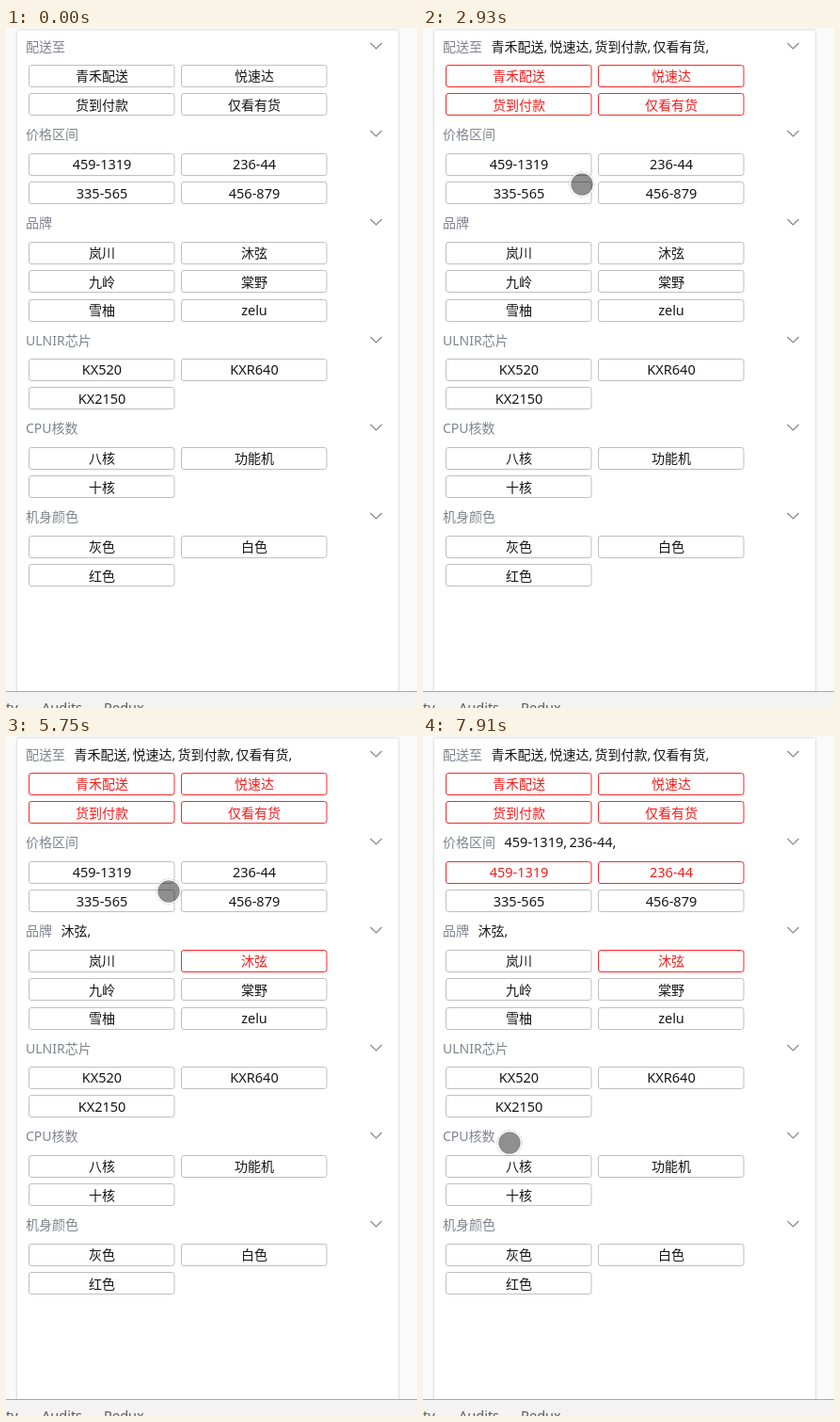
Animation, 437 px wide and 722 px high, one loop 7990 ms. Source, as an HTML page:

```html
<!DOCTYPE html>
<html lang="zh">
<head>
<meta charset="utf-8">
<title>筛选面板</title>
<style>
html, body { margin: 0; width: 100%; height: 100%; overflow: hidden; background: #fafafa; }
svg { display: block; width: 437px; height: 722px; }
text { font: 14px "Noto Sans", "Noto Sans CJK SC", "Noto Sans CJK JP", "Noto Sans CJK", sans-serif; fill: #161616; }
.latin { font-size: 14.5px; }
.head { fill: #80848c; }
.picked { word-spacing: -1.4px; }
.btn rect { fill: #fff; stroke: #bfbfbf; }
.btn text { text-anchor: middle; }
.btn.on rect { stroke: #f52a2a; }
.btn.on text { fill: #f51c1c; }
.chevron { fill: none; stroke: #85888e; stroke-width: 1.2; }
.tab { font-size: 14.5px; fill: #5c5c5c; }
</style>
</head>
<body>
<svg id="stage" viewBox="0 0 437 722">
  <defs>
    <filter id="soft" x="-5%" y="-5%" width="110%" height="110%"><feGaussianBlur stdDeviation="1.6"/></filter>
  </defs>
  <rect width="437" height="722" fill="#fafafa"/>
  <rect x="12" y="2.5" width="405" height="740" fill="#000" opacity=".22" filter="url(#soft)"/>
  <rect x="12" y="2.5" width="405" height="740" fill="#fff"/>
  <g id="panel"></g>
  <rect y="704" width="437" height="18" fill="#f3f3f3"/>
  <rect y="704" width="437" height="1" fill="#a8a8a8"/>
  <text class="tab" x="0" y="727">ty</text>
  <text class="tab" x="38" y="727">Audits</text>
  <text class="tab" x="104" y="727">Redux</text>
  <g id="cursor">
    <circle id="halo" fill="none" stroke="#000" stroke-opacity=".2"/>
    <circle r="12.4" fill="none" stroke="#fff" stroke-width="1.4"/>
    <circle id="dot" r="11.5" stroke="#000" stroke-opacity=".14"/>
  </g>
</svg>
<script>
const LOOP = 7990, STEP = 80;

// title, title centre y, title width, top of first button row, labels
const sections = [
  ['配送至', 20, 42, 39, ['青禾配送', '悦速达', '货到付款', '仅看有货']],
  ['价格区间', 113, 56, 133, ['459-1319', '236-44', '335-565', '456-879']],
  ['品牌', 207, 28, 227, ['岚川', '沐弦', '九岭', '棠野', '雪柚', 'zelu']],
  ['ULNIR芯片', 332, 72, 351, ['KX520', 'KXR640', 'KX2150']],
  ['CPU核数', 425, 56, 445, ['八核', '功能机', '十核']],
  ['机身颜色', 519, 56, 539, ['灰色', '白色', '红色']]
];

// time, section, option
const picks = [
  [1060, 0, 0], [1620, 0, 1], [2140, 0, 3], [2780, 0, 2],
  [5040, 2, 1], [6050, 1, 0], [7130, 1, 1]
];

// start, end, then [step, x, y]; a move begins where the last one ended
const moves = [
  [70, 820, [0, 313, 685], [1, 259, 512], [2, 217, 290], [4, 155, 130], [9, 94, 51]],
  [1060, 1450, [5, 229, 62]],
  [1620, 1910, [4, 233, 88]],
  [2140, 2550, [2, 205, 106], [5, 150, 88]],
  [2780, 3190, [2, 169, 166], [5, 171, 242]],
  [3720, 4500, [5, 318, 84], [7, 349, 108], [9, 308, 173], [10, 287, 227]],
  [4580, 4580, [0, 274, 247]],
  [4750, 4810, [0, 275, 238], [1, 275, 230]],
  [5040, 5810, [4, 240, 286], [7, 216, 215], [9, 173, 165], [10, 165, 164]],
  [5900, 5900, [0, 156, 163]],
  [6050, 6820, [3, 193, 238], [7, 168, 363], [10, 271, 211]],
  [6900, 6980, [0, 274, 185], [1, 275, 164]],
  [7130, 7910, [5, 190, 330], [10, 92, 432]]
];

const presses = [[890, 1060], [4750, 5040], [5900, 6050], [6980, 7130]];

const $ = id => document.getElementById(id);

function add(parent, tag, attrs, text) {
  const el = document.createElementNS('http://www.w3.org/2000/svg', tag);
  for (const key in attrs) el.setAttribute(key, attrs[key]);
  if (text) el.textContent = text;
  parent.appendChild(el);
  return el;
}

const latin = s => /^[\x20-\x7e]+$/.test(s) ? 'latin' : '';

const views = sections.map(([title, y, width, firstTop, labels]) => {
  const panel = $('panel');
  add(panel, 'text', { class: 'head', x: 21, y: y + 5 }, title);
  add(panel, 'path', { class: 'chevron', d: `M387.5 ${y - 4}l6 6l6 -6` });
  const picked = add(panel, 'text', { class: 'picked ' + latin(labels[0]), x: 30.5 + width, y: y + 5 });
  const buttons = labels.map((label, i) => {
    const x = 24.5 + (i % 2) * 162, top = firstTop + (i >> 1) * 30.5;
    const g = add(panel, 'g', { class: 'btn' });
    add(g, 'rect', { x, y: Math.floor(top) + .5, width: 154.5, height: 23, rx: 2.5 });
    add(g, 'text', { class: latin(label), x: x + 77.5, y: top + 17.2 }, label);
    return g;
  });
  return { picked, buttons, labels };
});

function cursorAt(t) {
  const index = moves.findLastIndex(m => m[0] <= t);
  if (index < 0) return null;
  const [start, end, ...path] = moves[index];
  if (path[0][0] > 0) path.unshift([0, ...moves[index - 1].at(-1).slice(1)]);
  const last = Math.round((end - start) / STEP);
  const step = last ? Math.min(last, Math.floor((t - start) / (end - start) * last + .25)) : 0;
  const next = path.findIndex(p => p[0] >= step);
  const b = path[next], a = path[Math.max(0, next - 1)];
  const f = b[0] > a[0] ? (step - a[0]) / (b[0] - a[0]) : 0;
  return [a[1] + (b[1] - a[1]) * f, a[2] + (b[2] - a[2]) * f];
}

function draw(t) {
  views.forEach(({ picked, buttons, labels }, s) => {
    const on = labels.map((_, i) => picks.some(p => p[0] <= t && p[1] === s && p[2] === i));
    buttons.forEach((b, i) => b.classList.toggle('on', on[i]));
    const text = labels.filter((_, i) => on[i]).map(l => l + ',').join(' ');
    if (picked.textContent !== text) picked.textContent = text;
  });

  const pos = cursorAt(t);
  $('cursor').style.display = pos ? '' : 'none';
  if (!pos) return;
  const down = presses.some(([a, b]) => t >= a && t < b);
  $('cursor').setAttribute('transform', `translate(${pos})`);
  $('halo').setAttribute('r', down ? 14.2 : 13.3);
  $('dot').setAttribute('fill', `rgba(0,0,0,${down ? .52 : .44})`);
}

const begin = performance.now();
function tick() {
  draw((performance.now() - begin) % LOOP);
  requestAnimationFrame(tick);
}
tick();
</script>
</body>
</html>
```
